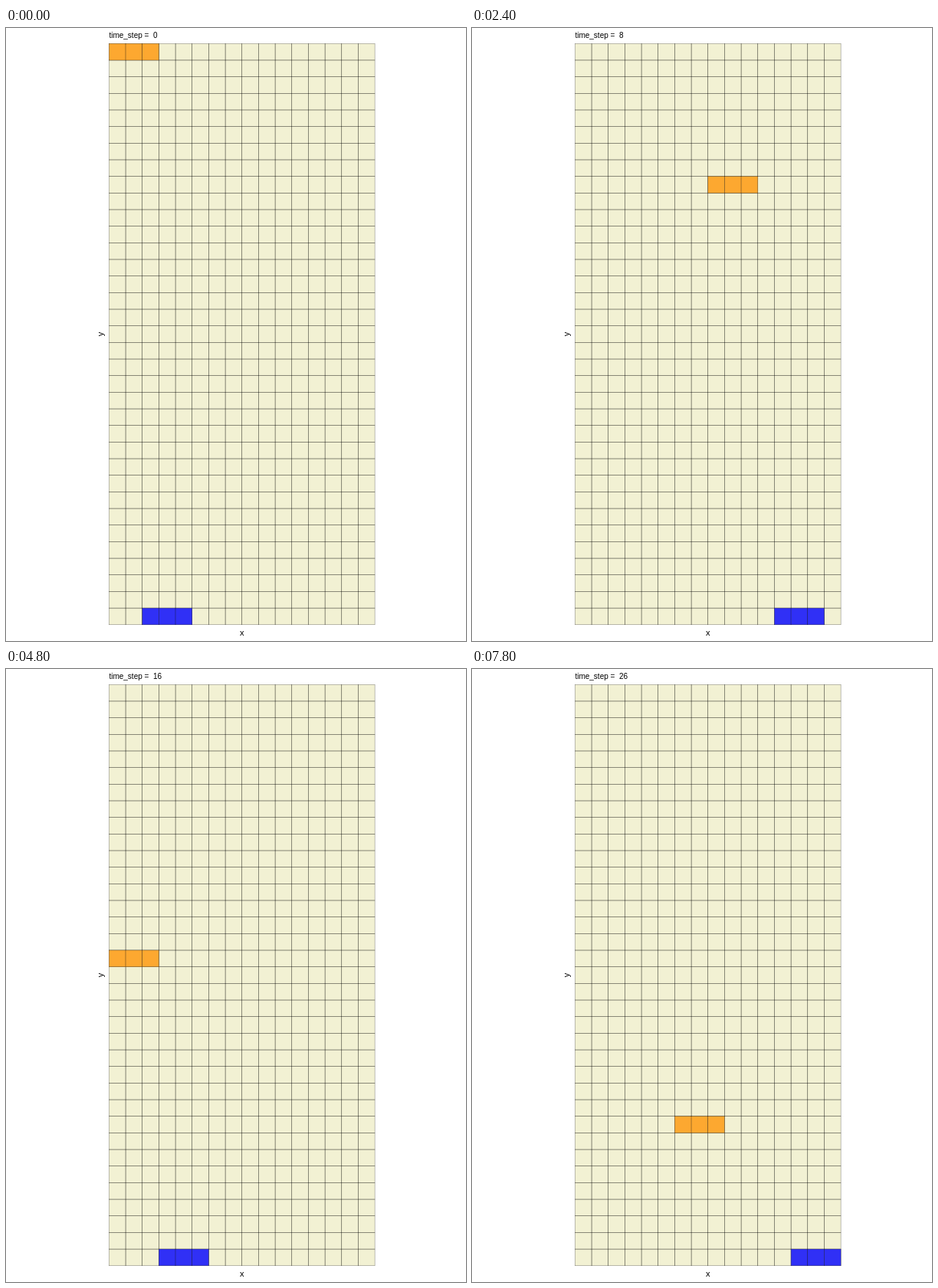
An HTML page with a canvas that plays this animation: 600 by 800 pixels, repeating every 8 s.

```html
<!DOCTYPE html>
<html lang="en">
<head>
<meta charset="utf-8">
<title>Grid steps</title>
<style>
  html, body { margin: 0; width: 100%; height: 100%; overflow: hidden; background: #fff; }
  canvas { display: block; }
</style>
</head>
<body>
<canvas id="stage" width="600" height="800"></canvas>
<script>
const ctx = document.getElementById('stage').getContext('2d');
const LOOP = 8000, STEP = 300;
const COLS = 16, ROWS = 35;
const LEFT = 134.4, TOP = 20.3, CELL = 21.67;
const FONT = '"Liberation Sans", Arial, sans-serif';

const wrap = n => ((n % COLS) + COLS) % COLS;

// The paddle runs left, rests, then runs right.
const paddleCol = step => step < 6 ? 2 - step : step < 9 ? -4 : step - 13;

function tile(col, row, fill) {
  const x = LEFT + col * CELL, y = TOP + row * CELL;
  ctx.fillStyle = fill;
  ctx.fillRect(x, y, CELL, CELL);
  ctx.strokeRect(x, y, CELL, CELL);
}

function bar(col, row, fill) {
  for (let i = 0; i < 3; i++) tile(wrap(col + i), row, fill);
}

function drawGrid() {
  ctx.fillStyle = '#f2f1d3';
  ctx.fillRect(LEFT, TOP, COLS * CELL, ROWS * CELL);
  for (let row = 0; row < ROWS; row++) {
    for (let col = 0; col < COLS; col++) {
      ctx.strokeRect(LEFT + col * CELL, TOP + row * CELL, CELL, CELL);
    }
  }
}

function drawLabels(step) {
  ctx.fillStyle = '#000';
  ctx.textAlign = 'left';
  ctx.font = '10px ' + FONT;
  ctx.fillText('time_step =  ' + step, LEFT, 13);

  ctx.textAlign = 'center';
  ctx.font = '11px ' + FONT;
  ctx.fillText('x', LEFT + COLS * CELL / 2, 793);
  ctx.save();
  ctx.translate(126.5, TOP + ROWS * CELL / 2);
  ctx.rotate(-Math.PI / 2);
  ctx.fillText('y', 0, 0);
  ctx.restore();
}

function draw(step) {
  ctx.fillStyle = '#fff';
  ctx.fillRect(0, 0, 600, 800);
  ctx.lineWidth = 0.5;
  ctx.strokeStyle = 'rgba(0, 0, 0, 0.5)';
  drawGrid();
  bar(-step, step, '#fda830');
  bar(paddleCol(step), ROWS - 1, '#3030f6');
  drawLabels(step);
}

const start = performance.now();
let shown = -1;

function tick() {
  const step = Math.floor((performance.now() - start) % LOOP / STEP);
  if (step !== shown) draw(shown = step);
  requestAnimationFrame(tick);
}
tick();
</script>
</body>
</html>
```
